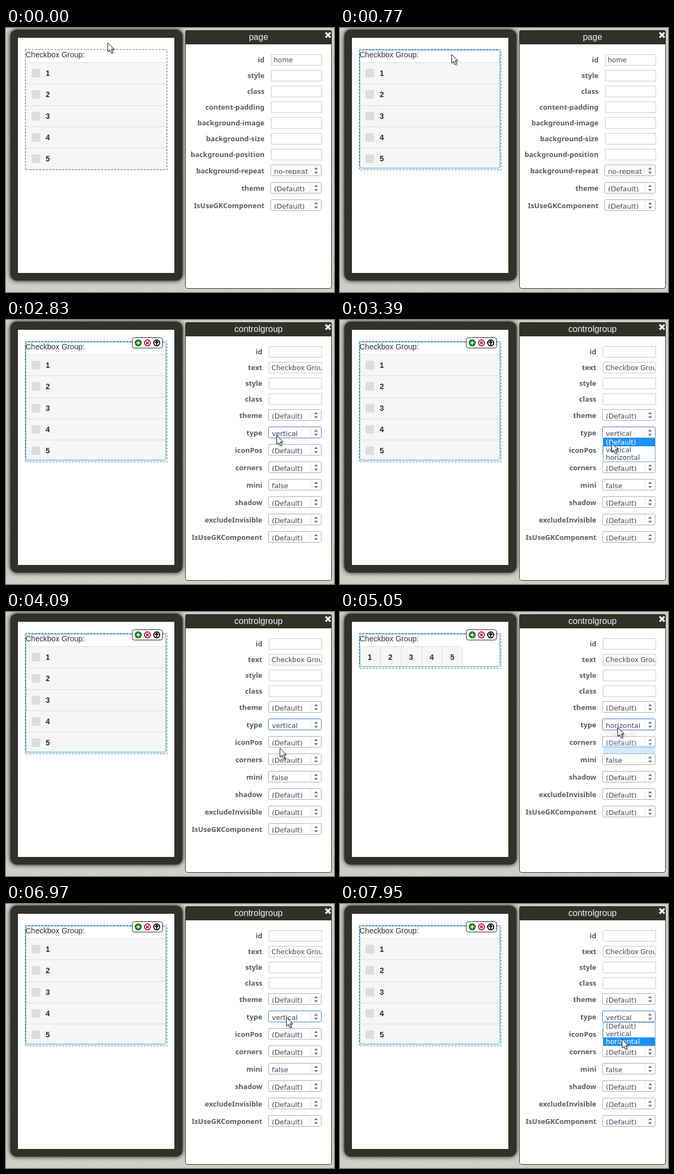
Recreate the animation shown at these times as an HTML page with a canvas. Size 604 by 485 pixels, loop 8000 ms.

```html
<!DOCTYPE html>
<html lang="en">
<head>
<meta charset="utf-8">
<title>Property editor</title>
<style>
html, body { margin: 0; width: 100%; height: 100%; overflow: hidden; background: #cfcfc7; }
canvas { display: block; width: 604px; height: 485px; }
</style>
</head>
<body>
<canvas id="stage" width="604" height="485"></canvas>
<script>
const W = 604, H = 485, LOOP = 8000, STEP = 60;
const DARK = '#31312a', INK = '#44485a', GREY = '#5b5b63';
const ARIAL = '"Liberation Sans", Arial, sans-serif';
const LABEL = 'bold 13.1px "Noto Sans", sans-serif';
const VALUE = '"DejaVu Sans", sans-serif';
const OPTIONS = ['(Default)', 'vertical', 'horizontal'];
const ctx = document.getElementById('stage').getContext('2d');

const HOVER = 650, PICK = 1500;
const HOME = { x: 187, y: 27 };

// pointer moves in steps of 60 ms, each ending at x, y
const MOVES = [
  { at: 530, steps: 5, x: 205, y: 48 },
  { at: 1830, steps: 3, x: 297, y: 108 },
  { at: 2010, steps: 8, x: 498, y: 212 },
  { at: 3270, steps: 8, x: 504, y: 250 },
  { at: 4550, steps: 5, x: 511, y: 212 },
  { at: 5560, steps: 3, x: 515, y: 236 },
  { at: 6670, steps: 5, x: 516, y: 208 },
  { at: 7270, steps: 8, x: 518, y: 246 },
  { at: 7890, steps: 2, x: 519, y: 248 }
];

const MENUS = [
  { focus: 2830, fade: 2830, close: 4090, apply: 4150 },
  { focus: 5050, fade: 4990, close: 6080, apply: 6210 },
  { focus: 6970, fade: 6970, close: LOOP, apply: LOOP }
];

const clamp = v => Math.max(0, Math.min(1, v));

function pointer(t) {
  let { x, y } = HOME;
  for (const m of MOVES) {
    const k = clamp((Math.floor((t - m.at) / STEP) + 1) / m.steps);
    x += (m.x - x) * k;
    y += (m.y - y) * k;
  }
  return [Math.round(x), Math.round(y)];
}

function menuState(t) {
  const m = MENUS.find(m => t >= m.focus && t < m.apply);
  if (!m) return { focus: false, alpha: 0 };
  const alpha = clamp(Math.floor((t - m.fade) / STEP) / 5);
  return { focus: true, alpha: t < m.close ? alpha : 0 };
}

function rect(x, y, w, h, color, c = ctx) {
  c.fillStyle = color;
  c.fillRect(x, y, w, h);
}

function round(x, y, w, h, r, fill, stroke) {
  ctx.beginPath();
  ctx.roundRect(x, y, w, h, r);
  if (fill) { ctx.fillStyle = fill; ctx.fill(); }
  if (stroke) { ctx.strokeStyle = stroke; ctx.lineWidth = 1; ctx.stroke(); }
}

function text(s, x, y, font, color, align = 'left') {
  ctx.font = font;
  ctx.fillStyle = color;
  ctx.textAlign = align;
  ctx.fillText(s, x, y);
}

function line(color, width, ...points) {
  ctx.strokeStyle = color;
  ctx.lineWidth = width;
  ctx.beginPath();
  points.forEach(p => ctx.lineTo(...p));
  ctx.stroke();
}

function cross(x, y, r, color, width) {
  line(color, width, [x - r, y - r], [x + r, y + r]);
  line(color, width, [x + r, y - r], [x - r, y + r]);
}

// faint woven backdrop
const backdrop = document.createElement('canvas');
backdrop.width = W;
backdrop.height = H;
{
  const c = backdrop.getContext('2d');
  let seed = 11;
  const rnd = () => (seed = seed * 16807 % 2147483647) / 2147483647;
  rect(0, 0, W, H, '#cfcfc7', c);
  for (let i = 0; i < 9000; i++) {
    const x = Math.floor(rnd() * W), y = Math.floor(rnd() * H);
    const tall = rnd() < .5;
    rect(x, y, tall ? 1 : 3, tall ? 3 : 1, rnd() < .5 ? 'rgba(255,255,255,.13)' : 'rgba(90,90,80,.07)', c);
  }
}

function phone() {
  ctx.save();
  ctx.shadowColor = '#000';
  ctx.shadowBlur = 9;
  round(8, 3, 317, 461, 12, DARK);
  ctx.restore();
  rect(22, 18, 288, 432, '#fff');
}

function toolbar() {
  const y = 42;
  round(232.5, 32.5, 56, 19, 4, '#fff', '#222');
  ['#0b7a12', '#b01040', '#000'].forEach((color, i) => {
    ctx.beginPath();
    ctx.arc(243.5 + i * 17, y, 5.5, 0, 7);
    ctx.fillStyle = i ? '#fff' : color;
    ctx.fill();
    ctx.strokeStyle = color;
    ctx.lineWidth = 1.8;
    ctx.stroke();
  });
  line('#fff', 2, [240, y], [247, y]);
  line('#fff', 2, [243.5, y - 3.5], [243.5, y + 3.5]);
  cross(260.5, y, 2.4, '#b01040', 2);
  line('#000', 2, [274.5, y], [277.5, y - 3], [280.5, y]);
  line('#000', 2, [277.5, y - 2], [277.5, y + 4]);
}

function verticalList(outlined, hover) {
  const bottom = outlined ? 258 : 260, width = outlined ? 259 : 260;
  rect(36, 63, width, bottom - 63, '#f6f6f6');
  if (hover) rect(36, 63, width, 39, '#ddd');
  for (let i = 0; i < 5; i++) {
    const mid = Math.round(83.1 + i * 39.2);
    rect(36, Math.round(63 + i * 39.3), width, 1, hover && i < 2 ? '#bbb' : '#ddd');
    round(47, mid - 8, 16, 16, 3, '#ddd');
    text(i + 1, 73, mid + 5, 'bold 14px ' + ARIAL, '#2b2b2b');
  }
  if (!outlined) round(36.5, 63.5, 259, 196, 0, null, '#ddd');
}

function horizontalList() {
  round(37.5, 63.5, 188, 37, [0, 4, 4, 0], '#f6f6f6', '#ddd');
  for (let i = 0; i < 5; i++) {
    if (i) rect(36 + i * 38, 64, 1, 36, '#ddd');
    text(i + 1, 55 + i * 38, 88, 'bold 14px ' + ARIAL, '#2b2b2b', 'center');
  }
}

function group(t, horizontal) {
  const outlined = t >= HOVER;
  const height = horizontal ? 64 : 221;
  if (horizontal) horizontalList();
  else verticalList(outlined, t >= 1890 && t < 2010);
  text('Checkbox Group:', 36, 54, '14px ' + ARIAL, '#333');
  ctx.save();
  ctx.setLineDash([3, 3]);
  round(35.5, 39.5, 261, height, 0, null, '#555');
  ctx.restore();
  if (outlined) round(36.5, 40.5, 258, height - 4, 4, null, '#1a9fd9');
  if (t >= PICK) toolbar();
}

function panel(title) {
  round(330.5, 4.5, 269, 474, 4, '#fff', DARK);
  round(330, 4, 270, 26, [4, 4, 0, 0], DARK);
  text(title, 465, 22, '16px ' + ARIAL, '#eaf6fb', 'center');
  cross(593, 13, 4.5, '#fff', 3.4);
}

function clipped(s, x, y, size, box) {
  ctx.save();
  ctx.beginPath();
  ctx.rect(...box);
  ctx.clip();
  text(s, x, y, `${size}px ${VALUE}`, INK);
  ctx.restore();
}

function field(name, value, x, row) {
  const y = 48 + row * 29;
  text(name, x - 12, y + 15, LABEL, GREY, 'right');
  round(x + .5, y + .5, 581 - x, 20, 0, '#fff', '#c9c9c9');
  clipped(value, x + 5, y + 15, 12.4, [x + 1, y, 580 - x, 21]);
}

function select(name, value, x, y, focus) {
  text(name, x - 11, y + 16, LABEL, GREY, 'right');
  if (focus) round(x - .5, y - .5, 582 - x, 22, 3, null, 'rgba(110,160,230,.35)');
  round(x + .5, y + .5, 580 - x, 20, 2, '#fff', focus ? '#6d90cc' : '#aaa');
  rect(561, y + 2, 1, 17, '#e2e2e2');
  for (const dir of [-1, 1]) {
    const base = y + 11 + dir * 2;
    ctx.fillStyle = '#777';
    ctx.beginPath();
    [[567.5, base], [571, base + dir * 4], [574.5, base]].forEach(p => ctx.lineTo(...p));
    ctx.fill();
  }
  clipped(value, x + 6.4, y + 17, 12.8, [x + 1, y + 1, 560 - x, 17]);
}

function pagePanel() {
  panel('page');
  ['id', 'style', 'class', 'content-padding', 'background-image', 'background-size', 'background-position']
    .forEach((name, i) => field(name, i ? '' : 'home', 488, i));
  ['background-repeat', 'theme', 'IsUseGKComponent']
    .forEach((name, i) => select(name, i ? '(Default)' : 'no-repeat', 487, 251 + i * 32));
}

function groupPanel(horizontal, focus) {
  panel('controlgroup');
  ['id', 'text', 'style', 'class']
    .forEach((name, i) => field(name, name === 'text' ? 'Checkbox Group:' : '', 484, i));
  const values = { type: horizontal ? 'horizontal' : 'vertical', mini: 'false' };
  ['theme', 'type', 'iconPos', 'corners', 'mini', 'shadow', 'excludeInvisible', 'IsUseGKComponent']
    .filter(name => !(horizontal && name === 'iconPos'))
    .forEach((name, i) => select(name, values[name] || '(Default)', 483, 164 + i * 32, focus && name === 'type'));
}

function menu(alpha, horizontal, py) {
  const chosen = horizontal ? 2 : 1;
  const active = py < 217 ? chosen : Math.min(2, Math.floor((py - 217) / 14));
  ctx.save();
  ctx.globalAlpha = alpha;
  round(484.5, 217.5, 96, 43, 0, '#fff', '#7d9cc0');
  OPTIONS.forEach((name, i) => {
    const y = 217 + i * 14, on = i === active;
    if (on) rect(485, y, 95, 15, '#1e90ff');
    text(name, 489.4, y + 12, '12.6px ' + VALUE, on ? '#fff' : INK);
  });
  ctx.restore();
}

function arrow(x, y) {
  ctx.save();
  ctx.translate(x + .5, y + .5);
  ctx.beginPath();
  [[0, 0], [0, 16], [3.7, 12.6], [6.3, 18.6], [9, 17.5], [6.4, 11.6], [11.3, 11.4]]
    .forEach(p => ctx.lineTo(...p));
  ctx.closePath();
  ctx.shadowColor = 'rgba(0,0,0,.45)';
  ctx.shadowBlur = 3;
  ctx.shadowOffsetX = ctx.shadowOffsetY = 2;
  ctx.fillStyle = '#fff';
  ctx.fill();
  ctx.shadowColor = 'transparent';
  ctx.strokeStyle = '#1c1c24';
  ctx.lineWidth = 1;
  ctx.stroke();
  ctx.restore();
}

function draw(t) {
  const horizontal = t >= MENUS[0].apply && t < MENUS[1].apply;
  const [px, py] = pointer(t);
  const { focus, alpha } = menuState(t);
  ctx.drawImage(backdrop, 0, 0);
  phone();
  group(t, horizontal);
  if (t < PICK) pagePanel();
  else groupPanel(horizontal, focus);
  if (alpha > 0) menu(alpha, horizontal, py);
  arrow(px, py);
}

const start = performance.now();
function tick() {
  draw((performance.now() - start) % LOOP);
  requestAnimationFrame(tick);
}
tick();
</script>
</body>
</html>
```
